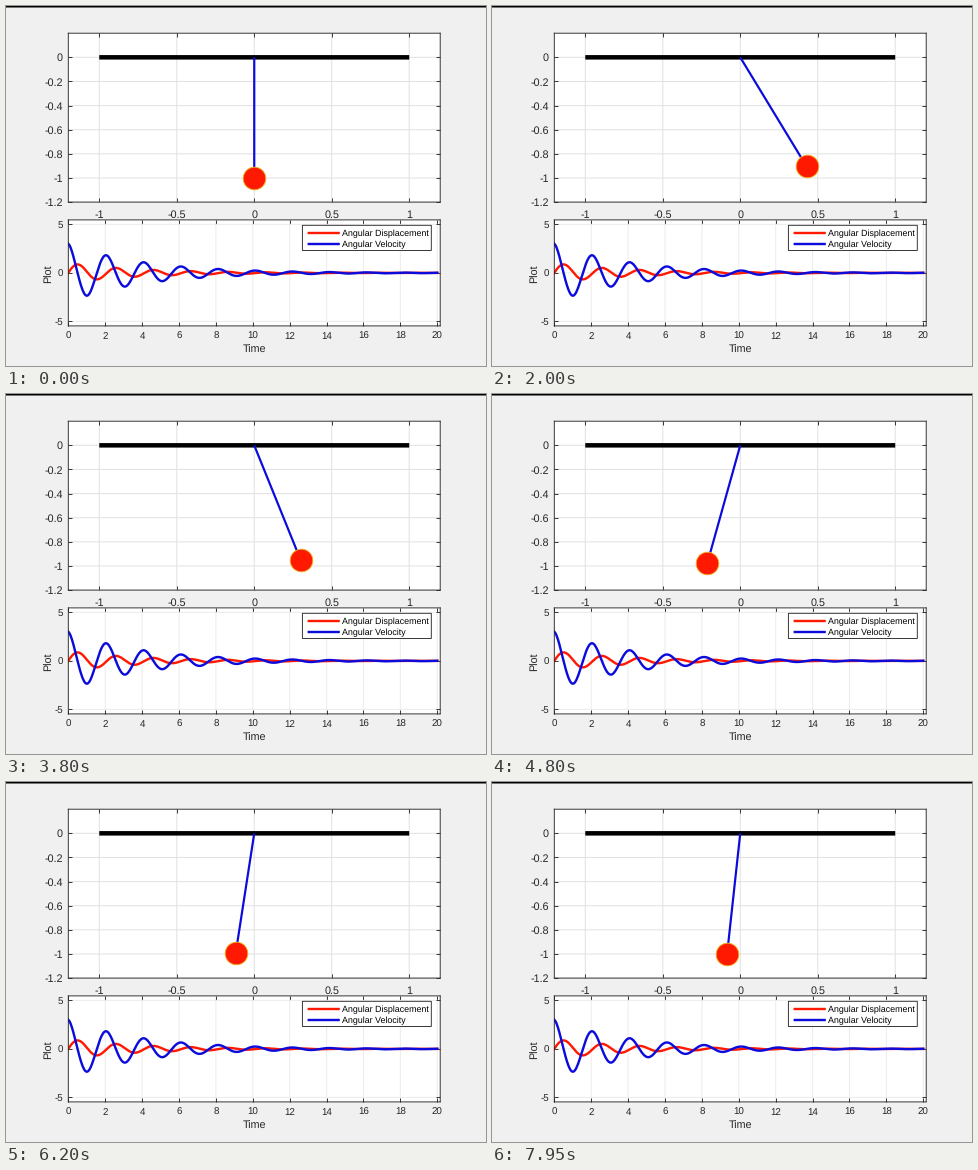
A matplotlib script for the animation above (8000 ms loop, 480 px wide and 360 px high).

```python
import math

import matplotlib.pyplot as plt
import numpy as np
from matplotlib.animation import FuncAnimation
from matplotlib.patches import Rectangle

W, H, DPI = 480, 360, 100
PX = 72 / DPI  # points per pixel
FRAMES, INTERVAL = 160, 50

RED, BLUE, GOLD = "#ff1900", "#0b0bdc", "#edb120"
INK, PAPER = "#262626", "#f0f0f0"

GRAVITY, LENGTH, MASS, DAMPING = 9.81, 1.0, 0.1, 0.05
T_END, SAMPLES, SUBSTEPS = 20, 500, 8

plt.rcParams["font.family"] = "Liberation Sans"
plt.rcParams["text.hinting"] = "no_hinting"
plt.rcParams["path.snap"] = False


def slope(state):
    angle, speed = state
    return np.array([speed, -DAMPING / MASS * speed - GRAVITY / LENGTH * math.sin(angle)])


def swing():
    """Damped pendulum, integrated with Runge-Kutta."""
    times = np.linspace(0, T_END, SAMPLES)
    h = (times[1] - times[0]) / SUBSTEPS
    state = np.array([0.0, 3.0])
    rows = [state]
    for _ in range(SAMPLES - 1):
        for _ in range(SUBSTEPS):
            k1 = slope(state)
            k2 = slope(state + h / 2 * k1)
            k3 = slope(state + h / 2 * k2)
            k4 = slope(state + h * k3)
            state = state + h / 6 * (k1 + 2 * k2 + 2 * k3 + k4)
        rows.append(state)
    angle, speed = np.array(rows).T
    return times, angle, speed


def panel(top, bottom, xlim, ylim, xticks, yticks, size, xpad, grid):
    left, right = 62.3, 434.2
    rect = [left / W, 1 - bottom / H, (right - left) / W, (bottom - top) / H]
    ax = fig.add_axes(rect, xlim=xlim, ylim=ylim)
    ax.set_xticks(xticks, [f"{v:g}" for v in xticks])
    ax.set_yticks(yticks, [f"{v:g}" for v in yticks])
    ax.tick_params(direction="in", top=True, right=True, length=4 * PX, width=0.9 * PX,
                   color=INK, labelcolor=INK, labelsize=size * PX)
    ax.tick_params(axis="x", pad=xpad * PX)
    ax.tick_params(axis="y", pad=5.5 * PX)
    for spine in ax.spines.values():
        spine.set(color=INK, linewidth=0.9 * PX, snap=False)
    ax.set_axisbelow(True)
    ax.grid(color=grid, linewidth=PX, snap=False)
    return ax


times, angle, speed = swing()
fig = plt.figure(figsize=(W / DPI, H / DPI), dpi=DPI, facecolor=PAPER)

# Pendulum
top = panel(27.2, 196.1, (-1.2, 1.2), (-1.2, 0.2),
            [-1, -0.5, 0, 0.5, 1], [-1.2, -1, -0.8, -0.6, -0.4, -0.2, 0],
            10.8, 8, "#e1e1e1")
top.plot([-1, 1], [0, 0], color="black", lw=4.5 * PX, solid_capstyle="butt")
rod, = top.plot([], [], color=BLUE, lw=2.2 * PX, solid_capstyle="butt")
bob, = top.plot([], [], "o", color=RED, ms=22.6 * PX, mec=GOLD, mew=0.9 * PX, snap=False)

# Time plot
low = panel(213.9, 319.9, (0, 20.16), (-5.46, 5.46),
            list(range(0, 21, 2)), [-5, 0, 5], 9.8, 6, "#ececec")
low.plot(times, angle, color=RED, lw=2.4 * PX)
low.plot(times, speed, color=BLUE, lw=2.4 * PX)

# Labels and legend, placed in pixels
page = fig.add_axes([0, 0, 1, 1], xlim=(0, W), ylim=(H, 0))
page.axis("off")
page.add_patch(Rectangle((0, 0), W, 1.5, color="black", lw=0, snap=False))
page.add_patch(Rectangle((296.4, 219.3), 128.9, 25.2, facecolor="white",
                         edgecolor=INK, lw=0.9 * PX, snap=False))
for y, color, name in [(227, RED, "Angular Displacement"), (238, BLUE, "Angular Velocity")]:
    page.plot([301.6, 333.8], [y, y], color=color, lw=2.4 * PX, solid_capstyle="butt")
    page.text(336.3, y + 3.3, name, size=8.9 * PX, color="black", va="baseline")
page.text(248.7, 347, "Time", size=10.8 * PX, color=INK, ha="center", va="baseline")
page.text(43, 268, "Plot", size=10.8 * PX, color=INK, ha="center", va="center", rotation=90)


def draw(frame):
    a = angle[int(1.5 * frame + 0.5)]
    x, y = LENGTH * math.sin(a), -LENGTH * math.cos(a)
    rod.set_data([0, x], [0, y])
    bob.set_data([x], [y])
    return rod, bob


anim = FuncAnimation(fig, draw, frames=FRAMES, interval=INTERVAL, repeat=True,
                     repeat_delay=0, blit=False)
plt.show()
```
